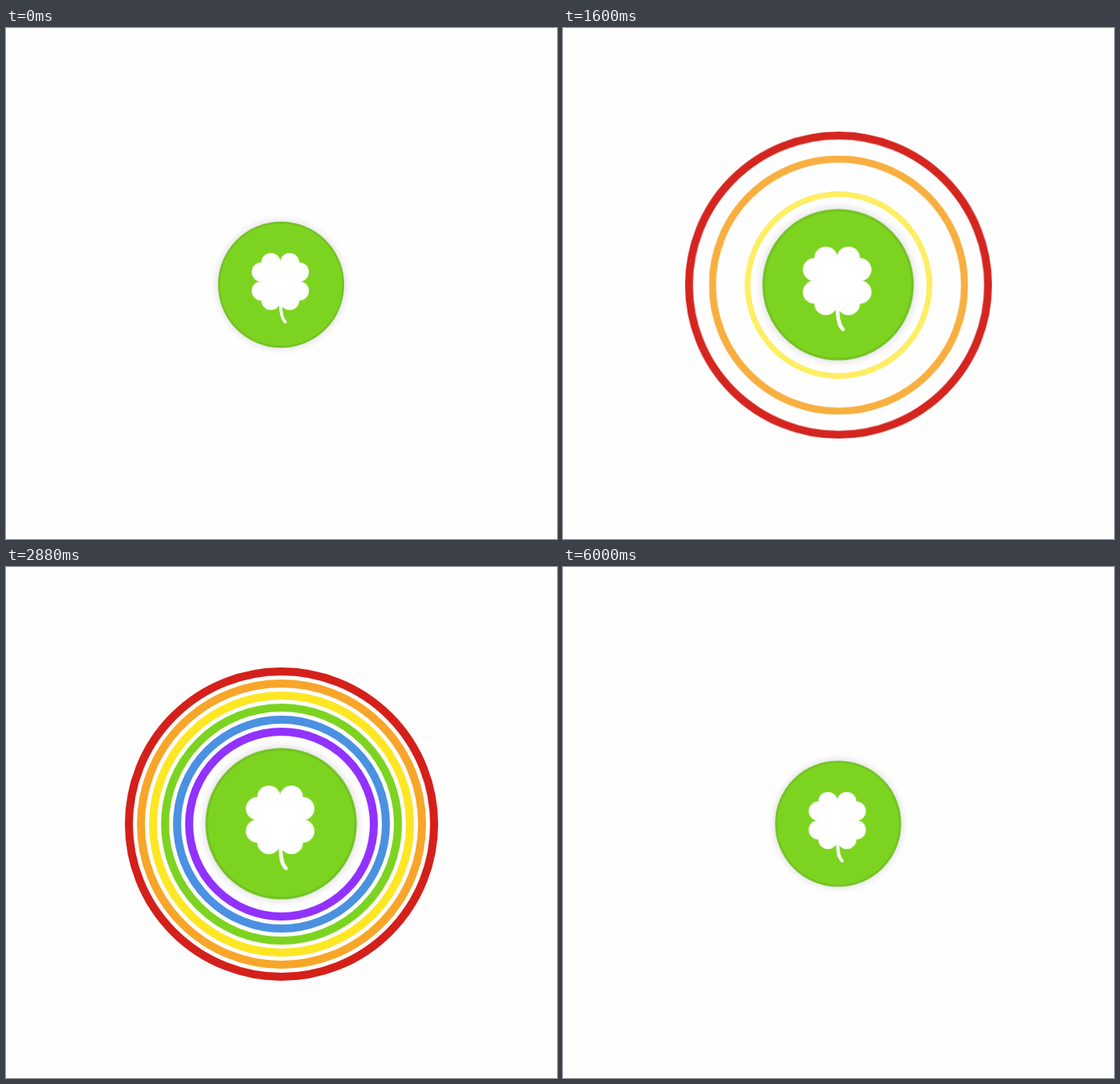
Write an HTML page that moves like this. It is 686 by 636 pixels and loops after 6080 ms.

```html
<!DOCTYPE html>
<html lang="en">
<head>
<meta charset="utf-8">
<title>Lucky clover</title>
<style>
  html, body { margin: 0; width: 100%; height: 100%; overflow: hidden; background: #fefefe; }
  svg { display: block; width: 686px; height: 636px; }

  .rings { animation: show 6080ms linear infinite; }
  .ring {
    fill: none;
    stroke-width: 10;
    transform-origin: 343px 320px;
    /* each ring starts 192 ms after the one outside it */
    animation: grow 6080ms calc(816ms + var(--i) * 192ms) infinite backwards;
  }
  .button {
    transform-origin: 342.5px 319.5px;
    animation: press 6080ms infinite;
  }
  .shadow { fill: #000; opacity: .14; filter: blur(5px); }
  .face { fill: #7dd420; stroke: #72c123; stroke-width: 2.5; }
  .clover { fill: #fff; }
  .stem { fill: none; stroke: #fff; stroke-width: 3.8; stroke-linecap: round; }

  @keyframes show {
    0%, 64.8% { opacity: 1; }
    64.81%, 100% { opacity: 0; }
  }
  @keyframes grow {
    0% { transform: scale(0); opacity: 0; animation-timing-function: ease; }
    15.79%, 60% { transform: scale(1); opacity: 1; }
    60.01%, 100% { transform: scale(0); opacity: 0; }
  }
  @keyframes press {
    0% { transform: scale(1); }
    13.42% { transform: scale(1); animation-timing-function: ease; }
    18.2% { transform: scale(1.2); }
    64.8% { transform: scale(1.2); animation-timing-function: ease; }
    69.6%, 100% { transform: scale(1); }
  }
</style>
</head>
<body>
<svg viewBox="0 0 686 636">
  <g class="rings">
    <circle class="ring" cx="343" cy="320" r="190" stroke="#d4201a" style="--i:0"/>
    <circle class="ring" cx="343" cy="320" r="175" stroke="#f8a62a" style="--i:1"/>
    <circle class="ring" cx="343" cy="320" r="160" stroke="#fde724" style="--i:2"/>
    <circle class="ring" cx="343" cy="320" r="145" stroke="#7dd420" style="--i:3"/>
    <circle class="ring" cx="343" cy="320" r="130" stroke="#4a91e2" style="--i:4"/>
    <circle class="ring" cx="343" cy="320" r="115" stroke="#9132ff" style="--i:5"/>
  </g>
  <g class="button">
    <circle class="shadow" cx="342.5" cy="319.5" r="79.5"/>
    <circle class="face" cx="342.5" cy="319.5" r="77.25"/>
    <g class="clover" transform="translate(341.5 315.5)">
      <defs>
        <g id="leaf">
          <circle cx="11.7" cy="23.6" r="12"/>
          <circle cx="23.6" cy="11.7" r="12"/>
        </g>
      </defs>
      <use href="#leaf"/>
      <use href="#leaf" transform="rotate(90)"/>
      <use href="#leaf" transform="rotate(180)"/>
      <use href="#leaf" transform="rotate(270)"/>
      <path d="M-11.7-23.6H11.7L23.6-11.7V11.7L11.7 23.6H-11.7L-23.6 11.7V-11.7Z"/>
    </g>
    <path class="stem" d="M342 344C342 355 343.2 361.5 347.6 365.8"/>
  </g>
</svg>
</body>
</html>
```
